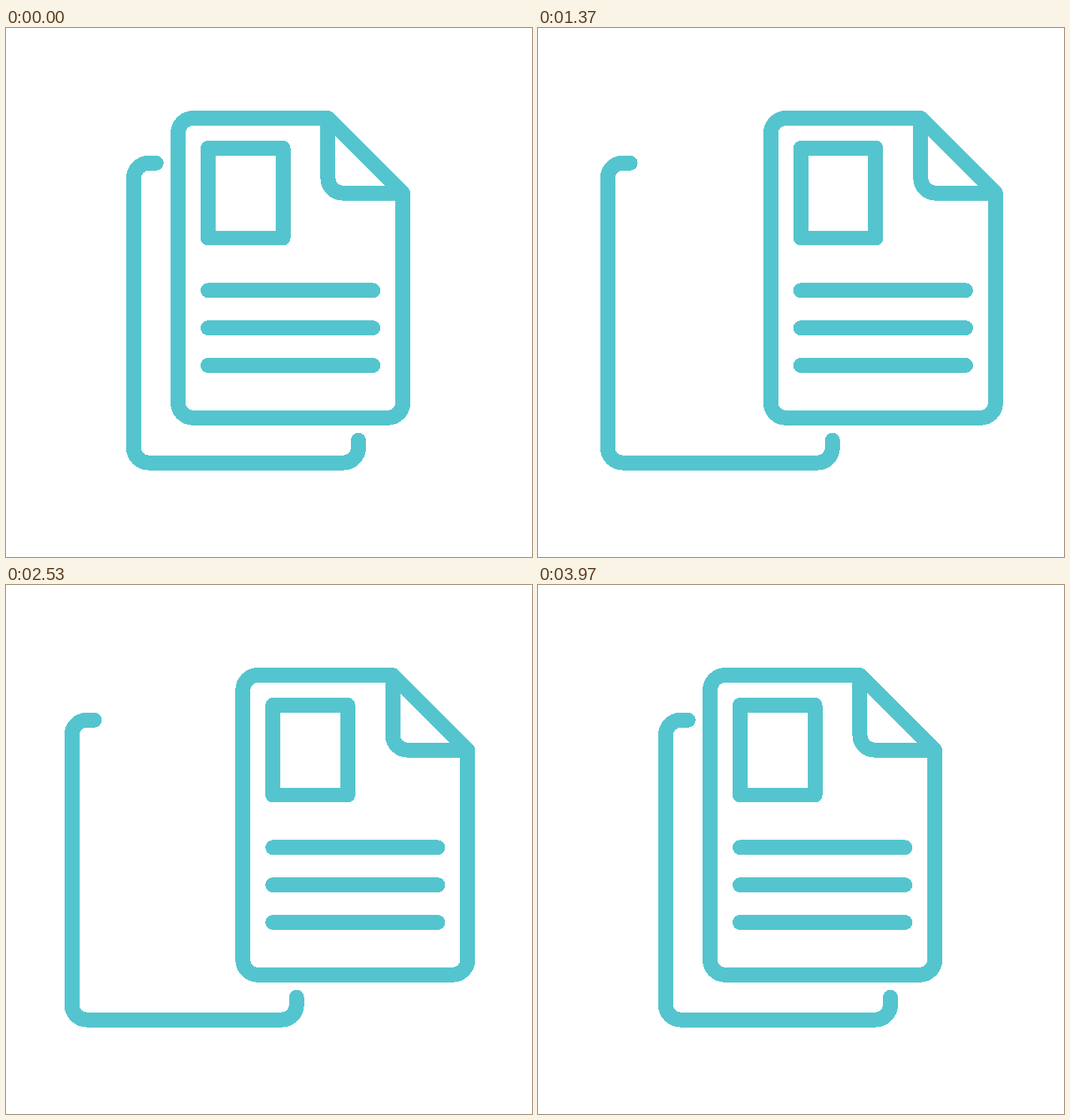
An HTML page that plays this animation: 700 by 704 pixels, repeating every 4010 ms.

```html
<!DOCTYPE html>
<html lang="en">
<head>
<meta charset="utf-8">
<title>Sliding documents</title>
<style>
  html, body { margin: 0; width: 100%; height: 100%; overflow: hidden; background: #fff; }
  svg { display: block; width: 100%; height: 100%; }
  path {
    fill: none; stroke: #54c5ce; stroke-width: 2;
    stroke-linecap: round; stroke-linejoin: round; shape-rendering: crispEdges;
  }
</style>
</head>
<body>
<svg viewBox="0 0 700 704">
  <g id="back">
    <path d="M3 6H2a2 2 0 0 0-2 2V44a2 2 0 0 0 2 2H28a2 2 0 0 0 2-2V43"/>
  </g>
  <g id="front">
    <path d="M20 0H2a2 2 0 0 0-2 2V38a2 2 0 0 0 2 2H28a2 2 0 0 0 2-2V10Z"/>
    <path d="M20 0V8a2 2 0 0 0 2 2H30"/>
    <path d="M4 4H14V16H4Z"/>
    <path d="M4 23H26M4 28H26M4 33H26"/>
  </g>
</svg>
<script>
  const LOOP = 4010, LAST_STEP = 119, PEAK_STEP = 60;
  const UNIT = 9.97, TOP = 120;
  const back = document.getElementById('back');
  const front = document.getElementById('front');

  // Thirty steps per second, with step times on a 10 ms grid.
  const stepAt = ms => Math.min(LAST_STEP, Math.floor((Math.floor(ms / 10) + 0.5) * 0.3));

  // Linear out to the peak, then linear back.
  const spread = step => step <= PEAK_STEP
    ? step / PEAK_STEP
    : (LAST_STEP - step) / (LAST_STEP - PEAK_STEP);

  const place = (el, x) =>
    el.setAttribute('transform', `translate(${x.toFixed(2)} ${TOP}) scale(${UNIT})`);

  function draw(ms) {
    const s = spread(stepAt(ms % LOOP));
    place(back, 169.9 - 112.9 * s);
    place(front, 229 + 118.3 * s);
  }

  const start = performance.now();
  function tick() {
    draw(performance.now() - start);
    requestAnimationFrame(tick);
  }
  tick();
</script>
</body>
</html>
```
